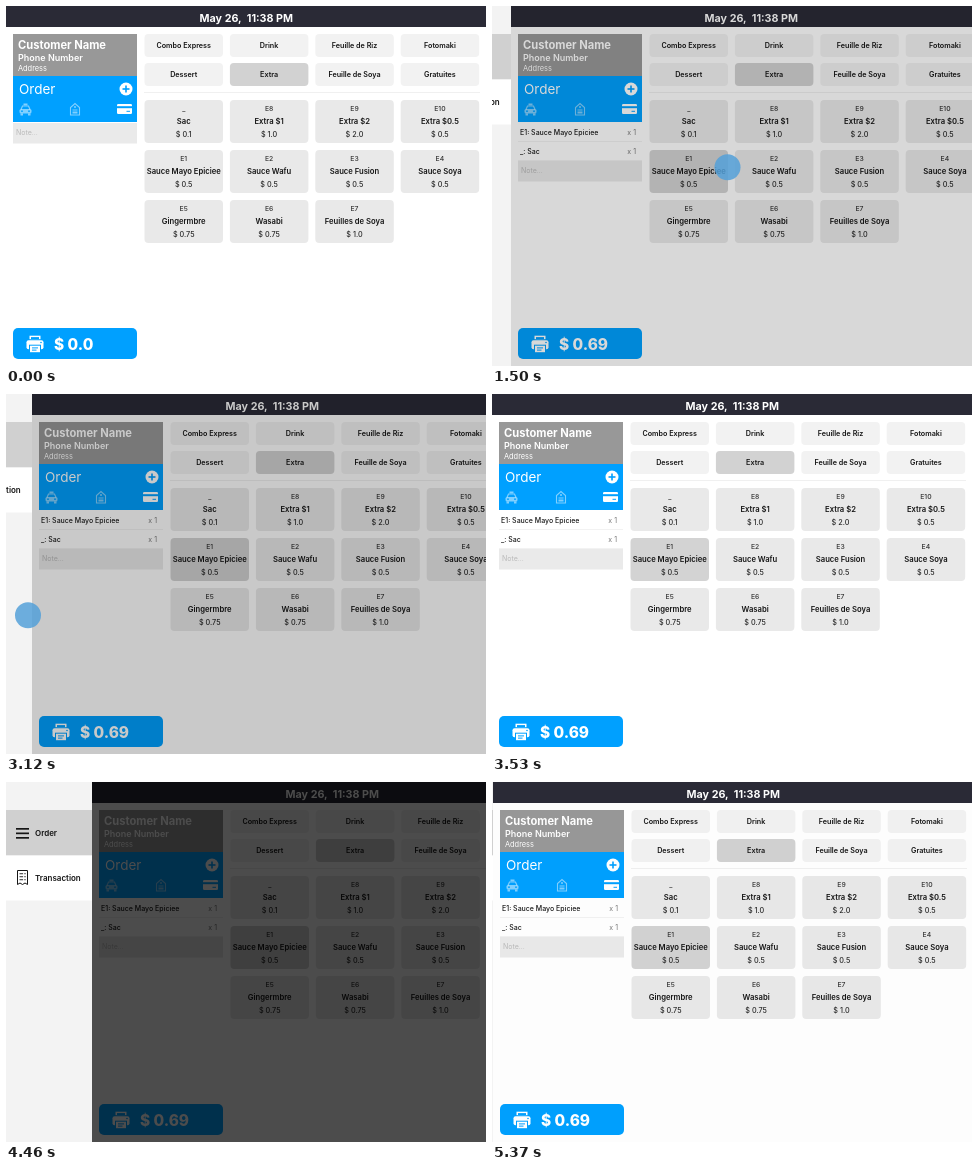
Recreate the animation shown at these times as an HTML page with a canvas. Size 480x360 px, loop 5.43 s.

```html
<!DOCTYPE html>
<html lang="en">
<head>
<meta charset="utf-8">
<title>Order screen</title>
<style>
html, body { margin: 0; width: 100%; height: 100%; overflow: hidden; background: #fff; }
canvas { display: block; width: 480px; height: 360px; }
</style>
</head>
<body>
<canvas id="stage"></canvas>
<script>
const W = 480, H = 360, LOOP = 5430, DRAWER = 86;
const BLUE = '#00a0ff', INK = '#161616';
const canvas = document.getElementById('stage');
const ctx = canvas.getContext('2d');
const dpr = window.devicePixelRatio || 1;
canvas.width = W * dpr;
canvas.height = H * dpr;

const tabs = ['Combo Express', 'Drink', 'Feuille de Riz', 'Fotomaki',
  'Dessert', 'Extra', 'Feuille de Soya', 'Gratuites'];
const goods = [
  ['_', 'Sac', '0.1'], ['E8', 'Extra $1', '1.0'], ['E9', 'Extra $2', '2.0'], ['E10', 'Extra $0.5', '0.5'],
  ['E1', 'Sauce Mayo Epiciee', '0.5'], ['E2', 'Sauce Wafu', '0.5'], ['E3', 'Sauce Fusion', '0.5'], ['E4', 'Sauce Soya', '0.5'],
  ['E5', 'Gingermbre', '0.75'], ['E6', 'Wasabi', '0.75'], ['E7', 'Feuilles de Soya', '1.0']
];
const SAC = 0, MAYO = 4;

// Drawer moves; span is the number of steps a full move takes
const moves = [
  { from: 1350, to: 1870, steps: 9, span: 8.65, open: true, held: 5 },
  { from: 2910, to: 3430, steps: 9, span: 8.65, open: false, held: 3 },
  { from: 4000, to: 4460, steps: 9, span: 8.65, open: true, held: 5 },
  { from: 5120, to: 5370, steps: 5, span: 5.2, open: false, held: 1 }
];

function rect(x, y, w, h, color) {
  ctx.fillStyle = color;
  ctx.fillRect(x, y, w, h);
}

function round(x, y, w, h, r, color) {
  ctx.fillStyle = color;
  ctx.beginPath();
  ctx.roundRect(x, y, w, h, r);
  ctx.fill();
}

function disc(x, y, r, color) {
  ctx.fillStyle = color;
  ctx.beginPath();
  ctx.arc(x, y, r, 0, Math.PI * 2);
  ctx.fill();
}

function path(points, color, width = 1, close = false) {
  ctx.beginPath();
  points.forEach(([x, y], i) => i ? ctx.lineTo(x, y) : ctx.moveTo(x, y));
  if (close) ctx.closePath();
  ctx.strokeStyle = color;
  ctx.lineWidth = width;
  ctx.stroke();
}

function text(str, x, y, size, weight, color, align = 'left') {
  ctx.font = `${weight} ${size}px Inter, "Liberation Sans", sans-serif`;
  ctx.textAlign = align;
  ctx.fillStyle = color;
  ctx.fillText(str, x, y);
}

const stepAt = (t, m) =>
  Math.min(m.steps - 1, Math.floor((t - m.from) * (m.steps - 1) / (m.to - m.from) + 1e-6));

function drawerAt(t) {
  let off = 0, finger = null;
  for (const m of moves) {
    if (t < m.from) break;
    const k = stepAt(t, m);
    const u = Math.min(1, (k + 0.65) / m.span);
    const p = m.open ? u * u * (3 - 2 * u) : Math.pow(1 - u, 2.2);
    off = Math.round(DRAWER * p);
    finger = k > m.held ? null : m.open ? [216.5 + off, 161.3] : [off - 4, 221.3];
  }
  return { off, finger };
}

function orderAt(t) {
  const k = t < 270 ? -1 : stepAt(t, { from: 270, to: 810, steps: 9 });
  const order = { items: [], total: '0.0', pressed: -1, finger: null };
  if (k >= 1) Object.assign(order, { items: [SAC], total: '0.12', pressed: SAC });
  if (k >= 6) Object.assign(order, { items: [MAYO, SAC], total: '0.69', pressed: MAYO });
  if (k >= 0 && k <= 2) order.finger = [190, 118];
  if (k >= 5 && k <= 7) order.finger = [195, 165];
  return order;
}

function taxi(x, y) {
  const c = 'rgba(255,255,255,.5)';
  path([[x - 4.5, y], [x - 3, y - 3.5], [x + 3, y - 3.5], [x + 4.5, y]], c, 1.2);
  rect(x - 2, y - 6, 4, 1.8, c);
  round(x - 6, y - 0.5, 12, 4.5, 1.5, c);
  rect(x - 5, y + 4, 2.5, 2, c);
  rect(x + 2.5, y + 4, 2.5, 2, c);
  disc(x - 3.5, y + 1.7, 0.9, BLUE);
  disc(x + 3.5, y + 1.7, 0.9, BLUE);
}

function bag(x, y) {
  const c = 'rgba(255,255,255,.5)';
  path([[x - 4.5, y + 5.5], [x - 4.5, y - 2], [x, y - 6], [x + 4.5, y - 2], [x + 4.5, y + 5.5]], c, 1.1, true);
  disc(x, y - 2.5, 1, c);
  rect(x - 2.5, y, 5, 1, c);
  rect(x - 2.5, y + 2, 5, 2, c);
}

function card(x, y) {
  round(x, y, 15, 10, 1.2, '#fff');
  rect(x, y + 2.2, 15, 2, BLUE);
  rect(x + 9.5, y + 6.8, 3.5, 1, BLUE);
}

function printer(x, y) {
  round(x - 8.5, y - 3.5, 17, 9, 2, '#fff');
  rect(x - 5.5, y - 8, 11, 3.5, '#fff');
  rect(x - 4, y - 6.6, 8, 2.1, BLUE);
  rect(x - 6, y + 1, 12, 7.5, BLUE);
  rect(x - 5, y + 2, 10, 6.5, '#fff');
  rect(x - 3, y + 3.7, 6, 1, BLUE);
  rect(x - 3, y + 5.9, 4.5, 1, BLUE);
  disc(x + 6, y - 1.2, 0.8, BLUE);
}

function sidebar(order) {
  rect(7, 28, 124, 42, '#989898');
  text('Customer Name', 12, 43, 11.15, 700, '#fff');
  text('Phone Number', 12, 54.5, 9, 600, '#fff');
  text('Address', 12, 64.5, 7.4, 400, '#fff');

  rect(7, 70, 124, 46, BLUE);
  text('Order', 13, 88.2, 13.5, 400, '#fff');
  disc(120, 83, 6.5, '#fff');
  rect(116.5, 82.2, 7, 1.6, BLUE);
  rect(119.2, 79.5, 1.6, 7, BLUE);
  taxi(19.5, 103.5);
  bag(69, 103.5);
  card(111, 98);

  order.items.forEach((id, i) => {
    const y = 117 + 19 * i;
    text(`${goods[id][0]}: ${goods[id][1]}`, 9, y + 11.7, 7, 500, INK);
    text('x 1', 125, y + 11.7, 7, 400, '#777', 'right');
    rect(7, y + 18.5, 124, 0.5, '#e4e4e4');
  });
  const y = 117 + 19 * order.items.length;
  rect(7, y, 124, 20.5, '#eaeaea');
  text('Note...', 10, y + 12.3, 7, 400, '#b9b9b9');

  round(7, 322, 124, 31, 5, BLUE);
  printer(29, 337.7);
  text('$ ' + order.total, 48, 343.5, 15.4, 800, '#fff');
}

function catalog(order) {
  tabs.forEach((name, i) => {
    const x = 138.5 + 85.4 * (i % 4), y = 28 + 29 * Math.floor(i / 4);
    round(x, y, 78.5, 23, 4, name === 'Extra' ? '#d2d2d2' : '#f2f2f2');
    text(name, x + 39.2, y + 14.4, 7.2, 600, INK, 'center');
  });
  rect(138, 86, 336, 0.6, '#e6e6e6');
  goods.forEach(([code, name, price], i) => {
    const x = 138.5 + 85.4 * (i % 4), y = 94 + 50 * Math.floor(i / 4);
    round(x, y, 78.5, 43, 4, i === order.pressed ? '#d3d3d3' : '#e9e9e9');
    text(code, x + 39.2, y + 10.9, 6.8, 500, '#333', 'center');
    text(name, x + 39.2, y + 23.8, 7.65, 600, INK, 'center');
    text('$ ' + price, x + 39.2, y + 36.8, 7.25, 500, '#2a2a2a', 'center');
  });
}

function menu() {
  rect(0, 0, DRAWER, H, '#f3f3f3');
  rect(0, 28, DRAWER, 45.5, '#d0d0d0');
  rect(0, 73.5, DRAWER, 45, '#fff');
  for (let i = 0; i < 3; i++) rect(10, 46 + 4.5 * i, 13, 1.7, INK);
  text('Order', 29, 54.2, 8, 600, INK);
  text('Transaction', 29, 99.2, 8, 600, INK);
  path([[11.5, 102.5], [11.5, 88.5], [21.5, 88.5], [21.5, 102.5], [19, 101], [16.5, 102.5], [14, 101]], INK, 1, true);
  for (let i = 0; i < 3; i++) {
    rect(13.5, 91.3 + 3 * i, 3.6, 0.9, INK);
    rect(18.3, 91.3 + 3 * i, 1.4, 0.9, INK);
  }
}

function draw(t) {
  const order = orderAt(t), { off, finger } = drawerAt(t);
  ctx.setTransform(dpr, 0, 0, dpr, 0, 0);
  rect(0, 0, W, H, '#fff');

  ctx.save();
  ctx.translate(off, 0);
  rect(0, 0, W, 21, '#2a2a36');
  text('May 26,  11:38 PM', 240.3, 16, 10.75, 700, '#fff', 'center');
  sidebar(order);
  catalog(order);
  rect(0, 0, W, H, `rgba(0,0,0,${0.7 * off / DRAWER})`);
  ctx.translate(-DRAWER, 0);
  if (off > 0) menu();
  ctx.restore();

  const touch = finger || order.finger;
  if (touch) disc(touch[0], touch[1], 13, 'rgba(84,160,216,.85)');
}

const start = performance.now();
function tick() {
  draw((performance.now() - start) % LOOP);
  requestAnimationFrame(tick);
}
tick();
</script>
</body>
</html>
```
